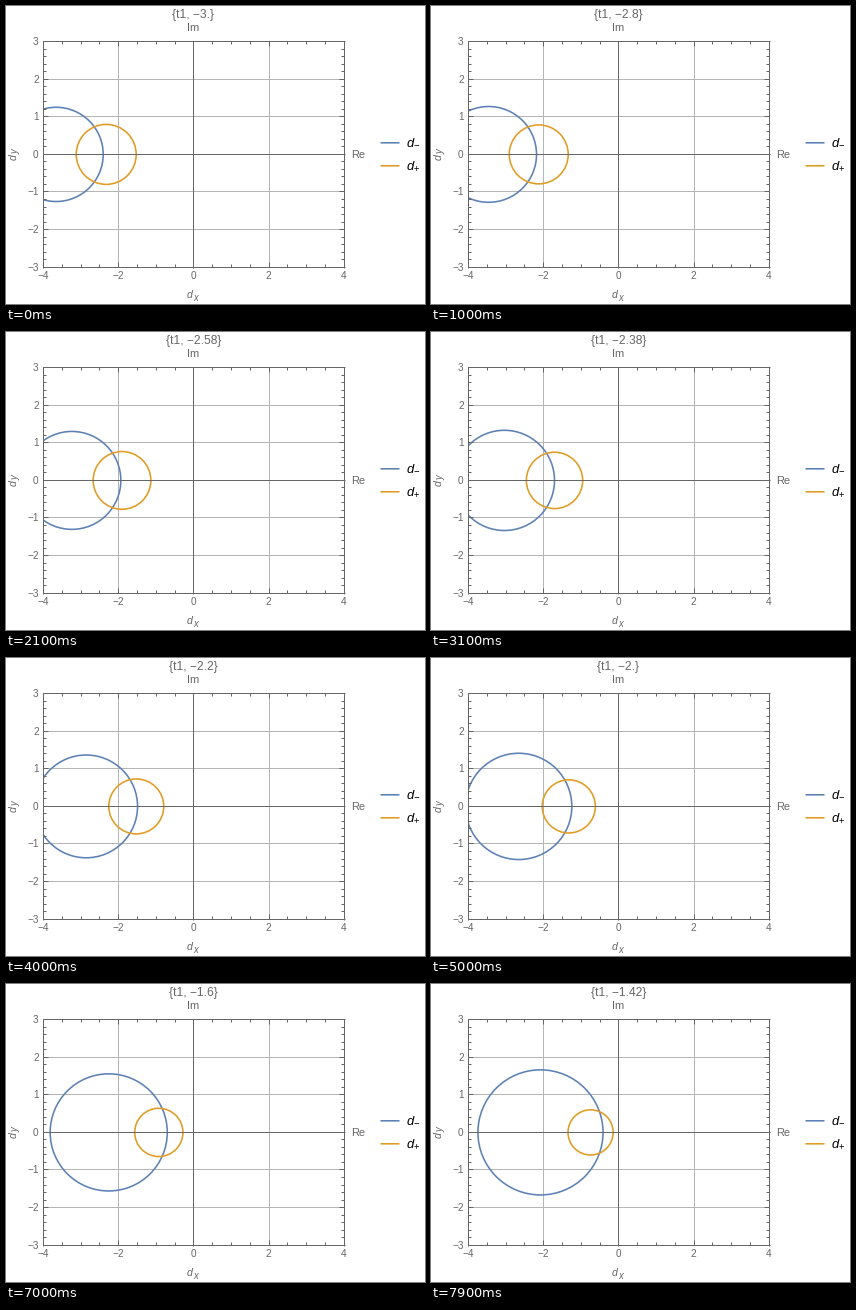
These frames come from a looping animation (419x298 px, 8 s). A matplotlib script:

```python
import numpy as np
import matplotlib.pyplot as plt
from matplotlib.animation import FuncAnimation
from matplotlib.patches import Circle, Rectangle

W, H, DPI = 419, 298, 64
X0, Y0, UNIT = 187.9, 148.4, 37.58
FRAMES, STEP = 80, 0.02
HALF_GAMMA = 2 / 3

BLUE = (0.368, 0.507, 0.710)
ORANGE = (0.881, 0.611, 0.142)
GRAY = "0.4"
GRID = "0.71"

plt.rcParams["font.family"] = "Liberation Sans"


def pt(px):
    return px * 72 / DPI


def sx(x):
    return X0 + UNIT * x


def sy(y):
    return Y0 - UNIT * y


def line(x1, y1, x2, y2, color=GRAY, z=4):
    """Crisp one-pixel line filling whole pixel rows or columns."""
    x, y = np.floor([x1, x2]), np.floor([y1, y2])
    ax.plot(x, y, color=color, lw=pt(1), zorder=z, solid_capstyle="butt")


def label(x, y, s, size=10, color=GRAY, ha="center", **kw):
    return ax.text(x, y, s, fontsize=pt(size), color=color, ha=ha,
                   va="baseline", **kw)


def number(v):
    return str(v).replace("-", "\u2212")


fig = plt.figure(figsize=(W / DPI, H / DPI), dpi=DPI, facecolor="white")
ax = fig.add_axes([0, 0, 1, 1])
ax.set_xlim(0, W)
ax.set_ylim(H, 0)
ax.axis("off")

left, right, top, bottom = sx(-4), sx(4), sy(3), sy(-3)

# grid, axes and frame
for x in (-2, 2):
    line(sx(x), top, sx(x), bottom, GRID, z=1)
for y in (-2, -1, 1, 2):
    line(left, sy(y), right, sy(y), GRID, z=1)
for x in (left, sx(0), right):
    line(x, top, x, bottom + 1)
for y in (top, sy(0), bottom):
    line(left, y, right + 1, y)

# ticks on all four sides
for i in range(-8, 9):
    size = 5 if i % 4 == 0 else 3
    x = sx(i / 2)
    line(x, top, x, top + size)
    line(x, bottom, x, bottom - size)
for i in range(-15, 16):
    size = 5 if i % 5 == 0 else 3
    y = sy(i / 5)
    line(left, y, left + size, y)
    line(right, y, right - size, y)

for x in range(-4, 5, 2):
    label(sx(x) - 0.8, 273, number(x))
for y in range(-3, 4):
    label(32.7, sy(y) + 3.4, number(y), ha="right")

# axis names
label(187.3, 25, "Im", 11)
label(345.5, 151.5, "Re", 11, ha="left")
label(180.5, 292.5, "d", 10.5, ha="left", style="italic")
label(187, 295, "x", 9.5, ha="left", style="italic")
label(10.5, 154, "d", 10.5, ha="left", style="italic", rotation=90,
      rotation_mode="anchor")
label(13, 148, "y", 9.5, ha="left", style="italic", rotation=90,
      rotation_mode="anchor")

# legend
for y, color, sign in ((137, BLUE, "\u2212"), (160, ORANGE, "+")):
    ax.plot([374.5, 393.5], [y - 0.2, y - 0.2], color=color, lw=pt(1.6),
            solid_capstyle="butt", snap=False)
    label(401, y + 4, "d", 13, "black", ha="left", style="italic")
    label(408, y + 6, sign, 9.5, "black", ha="left")

# moving loops
clip = Rectangle((left - 1, top), right - left + 2, bottom - top,
                 transform=ax.transData)


def loop(color):
    c = ax.add_patch(Circle((0, 0), 1, fill=False, ec=color, lw=pt(1.6),
                            zorder=3))
    c.set_clip_path(clip)
    return c


minus, plus = loop(BLUE), loop(ORANGE)
title = label(187.5, 12, "", 12)


def draw(i):
    t1 = -3 + STEP * i
    a, b = t1 - HALF_GAMMA, t1 + HALF_GAMMA
    r = np.sqrt(a / b)
    for c, x, radius in ((minus, a, r), (plus, b, 1 / r)):
        c.set_center((sx(x), Y0))
        c.set_radius(UNIT * radius)
    title.set_text("{t1, " + number(f"{t1:.2f}".rstrip("0")) + "}")
    return minus, plus, title


anim = FuncAnimation(fig, draw, frames=FRAMES, interval=100, repeat=True,
                     repeat_delay=0, blit=False)
plt.show()
```
